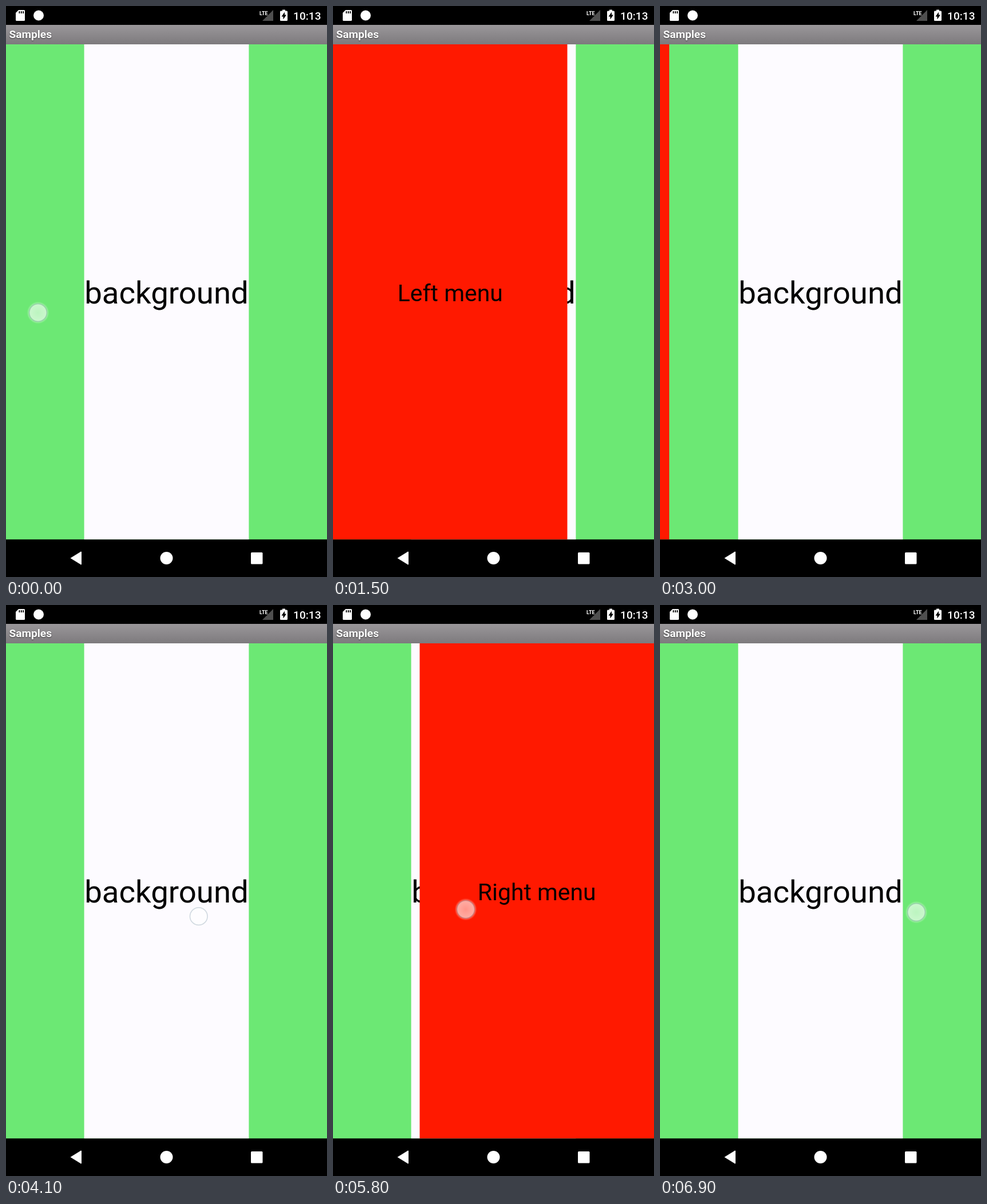
An HTML page with a canvas for the animation above (7 s loop, 561 px wide and 998 px high).

```html
<!DOCTYPE html>
<html lang="en">
<head>
<meta charset="utf-8">
<title>Samples</title>
<style>
  html, body { margin: 0; width: 100%; height: 100%; overflow: hidden; background: #000; }
  canvas { display: block; }
</style>
</head>
<body>
<canvas id="stage" width="561" height="998"></canvas>
<script>
const ctx = document.getElementById('stage').getContext('2d');
const W = 561, H = 998, LOOP = 7000, STEP = 100;
const TOP = 67, BOTTOM = 932.5, MENU = 409.5;
const DRAG_SLOP = 238; // finger travel from the screen edge before a menu follows

const smooth = k => (1 - Math.cos(Math.PI * k)) / 2;
const speedUp = k => k * k;
const slowDown = k => 1 - (1 - k) ** 1.66;
const cubicOut = k => 1 - (1 - k) ** 3;
const mix = (a, b, k) => a + (b - a) * k;
const progress = (t, start, end) => Math.min(1, Math.max(0, (t - start) / (end - start)));

const stroke = (start, end, from, to, ease) => ({ start, end, from, to, ease });
const strokes = [
  stroke(0, 500, [56, 536], [461, 536], smooth),
  stroke(500, 1000, [461, 536], [307, 533], smooth),
  stroke(1000, 1200, [307, 533], [325, 533], speedUp),
  stroke(2400, 2850, [344, 553], [186.5, 555], speedUp),
  stroke(3700, 4700, [510, 531], [207, 554], slowDown),
  stroke(5800, 6130, [232, 532], [390, 534], speedUp),
  stroke(6900, LOOP, [448, 537], [448, 537], smooth),
];

function fingerAt(t) {
  const s = strokes.find(s => t >= s.start && t <= s.end);
  if (!s) return null;
  const k = s.ease(progress(t, s.start, s.end));
  return { x: mix(s.from[0], s.to[0], k), y: mix(s.from[1], s.to[1], k) };
}

const settle = (from, to, start, end, t) => mix(from, to, cubicOut(progress(t, start, end)));

function leftEdge(t, finger) {
  if (t <= 1200) return Math.max(0, finger.x - DRAG_SLOP);
  if (t < 2400) return settle(87, MENU, 1195, 1445, t);
  if (t <= 2850) return MENU + finger.x - 344;
  return settle(252, 0, 2850, 3100, t);
}

function rightEdge(t, finger) {
  if (t < 3700) return W;
  if (t <= 4560) return Math.min(W, finger.x + DRAG_SLOP);
  if (t < 5800) return settle(456, W - MENU, 4560, 4960, t);
  if (t <= 6130) return W - MENU + finger.x - 232;
  return settle(309, W, 6130, 6380, t);
}

function rect(x, y, w, h, color, radius = 0) {
  ctx.fillStyle = color;
  ctx.beginPath();
  ctx.roundRect(x, y, w, h, radius);
  ctx.fill();
}

function disc(x, y, r, color) {
  ctx.fillStyle = color;
  ctx.beginPath();
  ctx.arc(x, y, r, 0, 2 * Math.PI);
  ctx.fill();
}

function polygon(points, color) {
  ctx.fillStyle = color;
  ctx.beginPath();
  points.forEach(p => ctx.lineTo(...p));
  ctx.closePath();
  ctx.fill();
}

function label(text, x, y, size, color = '#000', weight = 400, align = 'center') {
  ctx.font = `${weight} ${size}px Roboto, sans-serif`;
  ctx.textAlign = align;
  ctx.fillStyle = color;
  ctx.fillText(text, x, y);
}

function menu(x, text) {
  rect(x, TOP, MENU, BOTTOM - TOP, '#ff1900');
  label(text, x + MENU / 2, 515.7, 40.9, '#080000');
}

function touch({ x, y }) {
  const glow = ctx.createRadialGradient(x, y, 0, x, y, 19.5);
  glow.addColorStop(0, 'rgba(255,255,255,.54)');
  glow.addColorStop(0.74, 'rgba(255,255,255,.64)');
  glow.addColorStop(0.78, 'rgba(255,255,255,.4)');
  glow.addColorStop(1, 'rgba(255,255,255,0)');
  disc(x, y, 19.5, glow);
  ctx.strokeStyle = 'rgba(120,145,165,.33)';
  ctx.lineWidth = 1.7;
  ctx.beginPath();
  ctx.arc(x, y, 15.3, 0, 2 * Math.PI);
  ctx.stroke();
}

function statusBar() {
  rect(0, 0, W, 33, '#000');
  // memory card
  polygon([[22, 7], [32, 7], [33, 8], [33, 25], [32, 26], [18, 26], [17, 25], [17, 12]], '#fff');
  for (let i = 0; i < 3; i++) rect(22.5 + i * 3.4, 9, 1.8, 4, '#000');
  disc(57, 16.5, 9, '#fff');
  // signal and battery
  polygon([[467, 7], [467, 26], [448, 26]], '#4f4f4f');
  label('LTE', 443, 15.5, 9, '#fff', 700, 'left');
  rect(479, 8.5, 13, 17.5, '#fff', 1.5);
  rect(483, 6.5, 5, 3, '#fff');
  polygon([[487, 10.5], [481.5, 18.5], [484.5, 18.5], [484.5, 23.5], [490, 15.5], [487, 15.5]], '#000');
  label('10:13', 550.5, 23.7, 19.1, '#fff', 500, 'right');
}

function titleBar() {
  const shade = ctx.createLinearGradient(0, 33, 0, TOP);
  shade.addColorStop(0, '#9a979a');
  shade.addColorStop(1, '#7d7a7d');
  rect(0, 33, W, TOP - 33, shade);
  ctx.save();
  ctx.shadowColor = 'rgba(0,0,0,.55)';
  ctx.shadowBlur = 2;
  ctx.shadowOffsetY = 1;
  label('Samples', 5.5, 56.2, 19.1, '#fff', 700, 'left');
  ctx.restore();
}

function navigationBar() {
  rect(0, BOTTOM, W, H - BOTTOM, '#000');
  polygon([[112.5, 965], [131, 953.5], [132, 954], [132, 976], [131, 976.5]], '#fff');
  disc(280.5, 965, 11, '#fff');
  rect(428, 955, 20.5, 20.5, '#fff', 1.5);
}

function draw(t) {
  const finger = fingerAt(t);
  rect(0, TOP, W, BOTTOM - TOP, '#6ce874');
  rect(136.6, TOP, 287.8, BOTTOM - TOP, '#fdfbff');
  label('background', W / 2, 520.4, 54.55);

  const left = leftEdge(t, finger), right = rightEdge(t, finger);
  if (left > 0) menu(left - MENU, 'Left menu');
  if (right < W) menu(right, 'Right menu');

  statusBar();
  titleBar();
  navigationBar();
  if (finger) touch(finger);
}

function tick() {
  draw(Math.floor(performance.now() % LOOP / STEP) * STEP);
  requestAnimationFrame(tick);
}
tick();
</script>
</body>
</html>
```
